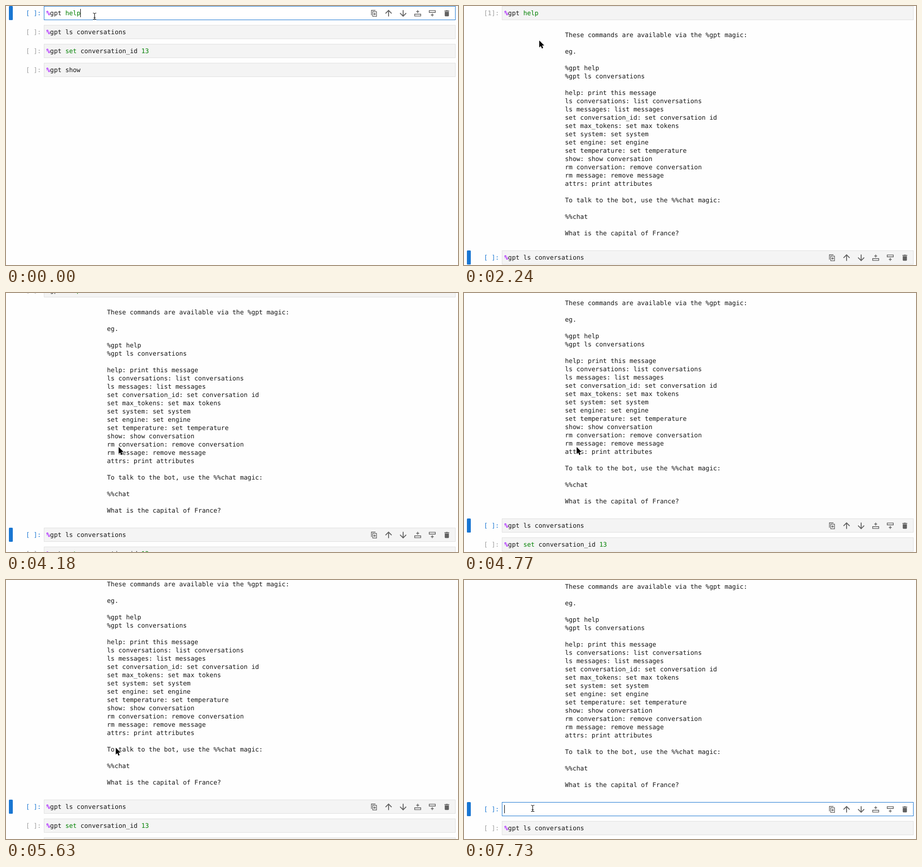
These frames come from a looping animation (931x533 px, 8000 ms). An HTML page:

```html
<!DOCTYPE html>
<html lang="en">
<head>
<meta charset="utf-8">
<title>Notebook commands</title>
<style>
html, body { margin: 0; width: 100%; height: 100%; overflow: hidden; background: #fefefe; }
svg { display: block; width: 931px; height: 533px; }
text {
  font: 13px "DejaVu Sans Mono", monospace;
  text-rendering: geometricPrecision;
  white-space: pre;
  fill: #161616;
}
.op { fill: #a2f; font-weight: bold; }
.word { fill: #008000; }
.idle { fill: #9c9c9c; }
.live { fill: #1976d2; }
.line { fill: none; stroke: #616161; }
.solid { fill: #616161; }
</style>
</head>
<body>
<svg id="stage" viewBox="0 0 931 533"></svg>
<script>
const LOOP = 8000, CHAR = 7.826, LINE = 17, PITCH = 39, OUTPUT = 464;
const RUN = 2100, DONE = 2240, EDIT = 6230, ESCAPE = 6980, INSERT = 7130, ENTER = 7730;

const commands = ['%gpt help', '%gpt ls conversations', '%gpt set conversation_id 13', '%gpt show'];
const output = `These commands are available via the %gpt magic:

eg.

%gpt help
%gpt ls conversations

help: print this message
ls conversations: list conversations
ls messages: list messages
set conversation_id: set conversation id
set max_tokens: set max tokens
set system: set system
set engine: set engine
set temperature: set temperature
show: show conversation
rm conversation: remove conversation
rm message: remove message
attrs: print attributes

To talk to the bot, use the %%chat magic:

%%chat

What is the capital of France?`.split('\n');

// time, scroll offset, pointer x, pointer y, pointer shape
const poses = [
  [0, 0, 182, 21, 'beam'], [450, 0, 161, 60, 'arrow'], [600, 0, 155, 71, 'arrow'],
  [3590, 0, 168, 118, 'arrow'], [3740, 0, 198, 220, 'arrow'], [3890, 0, 224, 298, 'arrow'],
  [4030, 8, 232, 317, 'arrow'], [4180, 20, 232, 317, 'arrow'], [4330, 31, 232, 317, 'arrow'],
  [4470, 37, 232, 317, 'arrow'], [4770, 39, 232, 317, 'arrow'], [4920, 45, 232, 317, 'arrow'],
  [5070, 57, 232, 317, 'arrow'], [5180, 67, 232, 317, 'arrow'], [5330, 73, 232, 317, 'arrow'],
  [5480, 66, 232, 317, 'arrow'], [5630, 51, 226, 345, 'arrow'], [5780, 46, 194, 415, 'arrow'],
  [5930, 46, 163, 468, 'beam'], [6080, 46, 144, 503, 'beam'], [6230, 46, 140, 493, 'beam'],
  [6380, 46, 139, 487, 'beam'], [6680, 46, 139, 486, 'beam'], [6830, 46, 139, 481, 'beam'],
  [6980, 46, 140, 475, 'beam'], [7280, 46, 141, 471, 'beam'], [7430, 46, 141, 470, 'beam']
];

const pointers = {
  arrow: '<path d="M0 0V14.2L3.3 11.2 5.5 16.4 8 15.3 5.8 10.3H10.3Z" stroke="#fff" stroke-width="2" paint-order="stroke"/>',
  beam: ['#fff" stroke-width="2.4', '#111" stroke-width="1.1'].map(ink =>
    `<path d="M-3-6.5Q0-6.5 .5-4.8Q1-6.5 4-6.5M.5-5V5M-3 6.5Q0 6.5 .5 4.8Q1 6.5 4 6.5M-1.5 2.5H2.5" fill="none" stroke="${ink}"/>`).join('')
};

// Icons are centred on their own origin
const icons = [
  '<path class="line" stroke-width="1.3" d="M-5.4 4V-6H3M-2.6-3.3H5.2V6.3H-2.6ZM1.3-.9V3.9M-1.1 1.5H3.7"/>',
  '<path class="line" stroke-width="1.8" d="M0 6.5V-5.5M-6.3 .3L0-6 6.3 .3"/>',
  '<path class="line" stroke-width="1.8" d="M0-6.5V5.5M-6.3-.3L0 6 6.3-.3"/>',
  '<path class="line" stroke-width="1.4" d="M-6.3 1.7H6.3V5.6H-6.3ZM0-6.5V-.5M-3-3.5H3"/>',
  '<path class="line" stroke-width="1.4" d="M-6.3-5.6H6.3V-1.7H-6.3ZM0 .5V6.5M-3 3.5H3"/>',
  '<path class="solid" d="M-5-5.5H-2.5L-1.7-6.3H1.7L2.5-5.5H5V-4H-5ZM-4.3-3.2H4.3V4.8Q4.3 6.2 2.9 6.2H-2.9Q-4.3 6.2-4.3 4.8Z"/>'
];
const toolbar = icons.map((icon, i) => `<g transform="translate(${758 + 30 * i} 15)">${icon}</g>`).join('');

const text = (x, y, body, kind = '') => `<text x="${x}" y="${y}" class="${kind}">${body}</text>`;
const colour = code => code.replace(/%|help|set|\d+/g, s =>
  `<tspan class="${s === '%' ? 'op' : 'word'}">${s}</tspan>`);

function cell(y, code, prompt, active, editing, caret) {
  const fill = editing ? '#fff' : '#f4f4f4', edge = editing ? '#1976d2' : '#e0e0e0';
  return `<g transform="translate(0 ${y})">
    ${active ? '<rect class="live" x="6" width="8" height="29" rx="1.5"/>' : ''}
    <rect x="78.5" y=".5" width="847" height="28" fill="${fill}" stroke="${edge}"/>
    ${text(41, 19, prompt, active ? 'live' : 'idle')}
    ${text(83, 19, colour(code))}
    ${active ? toolbar : ''}
    ${caret ? `<rect x="${Math.floor(83 + code.length * CHAR)}" y="6" width="1" height="17"/>` : ''}
  </g>`;
}

function scene(t) {
  const [, scroll, x, y, shape] = poses.filter(p => p[0] <= t).pop();
  const first = t < RUN, done = t >= DONE;
  const editing = first || (t >= EDIT && t < ESCAPE) || t >= ENTER;
  const caret = first ? t < 450 || (t >= 1050 && t < 1500) : editing;
  const list = [...commands];
  if (t >= INSERT) list.splice(1, 0, '');

  const cells = list.map((code, i) => {
    const active = i === (first ? 0 : 1);
    const prompt = i || first ? '[ ]:' : done ? '[1]:' : '[*]:';
    const top = i * PITCH + (i && done ? OUTPUT : 0);
    return cell(top, code, prompt, active, active && editing, active && caret);
  }).join('');
  const lines = done ? output.map((s, i) => text(208, 64 + i * LINE, s)).join('') : '';

  return `<g transform="translate(0 ${-scroll})">${cells}${lines}</g>
    <g transform="translate(${x} ${y})">${pointers[shape]}</g>`;
}

const stage = document.getElementById('stage');
let shown = '';
function frame() {
  const next = scene(performance.now() % LOOP);
  if (next !== shown) stage.innerHTML = shown = next;
  requestAnimationFrame(frame);
}
frame();
</script>
</body>
</html>
```
